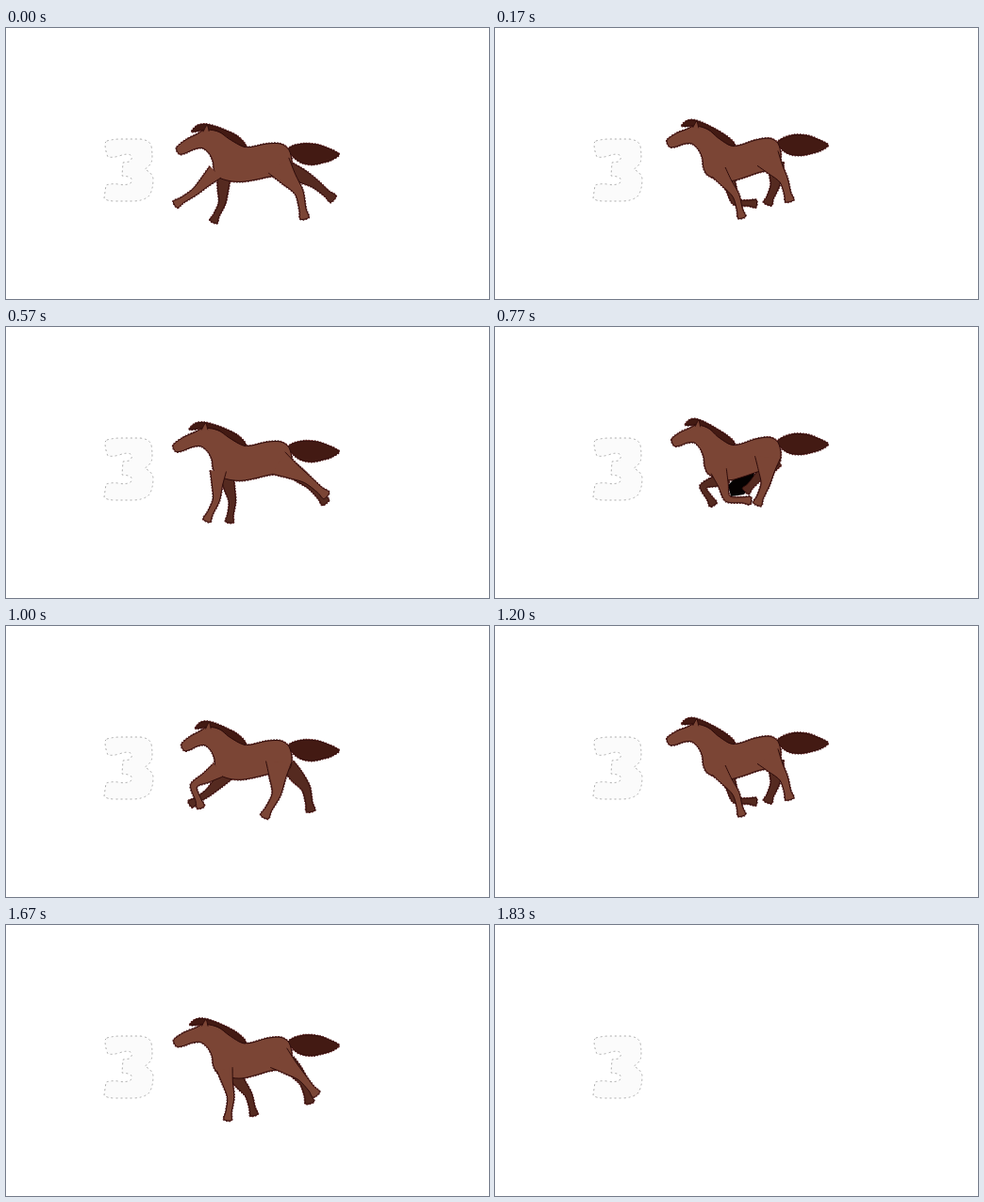
Animation of 512 by 288 pixels, one loop 2010 ms. Source, as an HTML page:

```html
<!DOCTYPE html>
<html lang="en">
<head>
<meta charset="utf-8">
<title>Galloping horse</title>
<style>
html, body { margin: 0; width: 100%; height: 100%; overflow: hidden; background: #fff; }
svg { display: block; width: 100vw; height: 100vh; }
path { stroke-linejoin: round; }
.digit { fill: #fbfbfb; stroke: #777; stroke-width: .6; stroke-dasharray: 2 3; }
.pose { visibility: hidden; }
.fringe { fill: none; stroke: #3a1010; stroke-width: 2.4; stroke-dasharray: 1.6 1.4; }
.rim { fill: #8f4440; stroke: #a5544e; stroke-width: 1.2; }
.coat { fill: #7b4535; }
.shade { fill: #552a20; }
.hair { fill: #431a13; }
.gap { fill: #050202; }
.line { fill: none; stroke: #2c0b0a; stroke-width: 1; }
</style>
</head>
<body>
<svg id="stage" viewBox="0 0 512 288">
  <path class="digit" role="img" aria-label="3" d="M107 120Q114 118 122 118H142Q152 119 154 125Q156 138 154 143Q151 148 147 150Q155 154 156 160Q156 173 151 179Q145 184 134 184H116Q107 184 104 181L106 167Q112 165 119 166Q128 168 133 164Q134 159 130 158L123 157L124 143L131 142Q135 138 132 135Q128 133 120 136Q113 138 108 137Q105 130 105 122Z"/>
</svg>
<script>
const stage = document.getElementById('stage');
const points = text => text.split(' ').map(pair => pair.split(',').map(Number));

// The horse at mid-stride.
const body = points('183,123 186,130 193,129 200,126 209,125 216,131 220,140 221,149 225,157 237,162 250,163 264,160 278,156 299,151 303,139 300,126 291,120 276,121 256,126 243,120 228,110 214,105 204,110 193,115');
const mane = points('199,107 204,101 212,100 222,103 233,108 244,114 252,121 254,126 247,124 236,117 226,109 214,106');
const tail = points('299,126 305,121 317,118 331,119 342,123 353,129 345,135 335,138 325,140 315,139 307,135');
const ear = points('210,108 214,101 216,108');

// Degrees forward of straight down for each pose of the stride.
const fore = {
  upper: [46, 4, -12, -36, -18, 65, 57], lower: [57, 25, 8, -15, -85, -30, -18],
  length: [31, 24], widths: [17, 11, 7, 6, 8], far: [9, 5]
};
const hind = {
  upper: [-37, -60, -50, -36, 5, 48, 4], lower: [-12, -50, -40, -16, 22, 42, 28],
  length: [36, 28], widths: [27, 17, 9, 7, 9], far: [10, 3]
};
const poseCount = 7, gathered = 4;

// Start of each step; the stride repeats until the horse vanishes.
const steps = [0, 30, 100, 170, 270, 350, 430, 500, 570, 640, 700, 770, 830, 950,
  1070, 1100, 1150, 1200, 1270, 1350, 1430, 1500, 1570, 1670, 1770];
const goneAt = 1830, loop = 2010;

// Smooth curve through points.
function curve(pts, closed = true) {
  const n = pts.length;
  const at = i => closed ? pts[(i + n) % n] : pts[Math.max(0, Math.min(n - 1, i))];
  let d = 'M' + pts[0];
  for (let i = 0; i < (closed ? n : n - 1); i++) {
    const [p, a, b, q] = [at(i - 1), at(i), at(i + 1), at(i + 2)];
    const c1 = a.map((v, j) => v + (b[j] - p[j]) / 7);
    const c2 = b.map((v, j) => v - (q[j] - a[j]) / 7);
    d += `C${c1} ${c2} ${b}`;
  }
  return closed ? d + 'Z' : d;
}

// Head and rump rise and fall about the withers while the head nods.
const rock = (pts, phase) => pts.map(([x, y]) => {
  const reach = Math.max(0, Math.min(1, (235 - x) / 50));
  const lift = Math.min(1.4, Math.abs(x - 245) / 55);
  return [x - 6 * Math.sin(phase + .35) * reach, y + 3.7 * Math.cos(phase) * lift];
});

const along = ([x, y], angle, length) => {
  const a = angle * Math.PI / 180;
  return [x - length * Math.sin(a), y + length * Math.cos(a)];
};
const between = (a, b, k) => a.map((v, i) => v + (b[i] - v) * k);

// Tapered limb, left open at the top so it merges with the torso.
function limb(joints, widths) {
  const left = [], right = [];
  joints.forEach(([x, y], i) => {
    const a = joints[Math.max(0, i - 1)], b = joints[Math.min(joints.length - 1, i + 1)];
    const dx = b[0] - a[0], dy = b[1] - a[1], r = widths[i] / 2 / Math.hypot(dx, dy);
    left.push([x - dy * r, y + dx * r]);
    right.unshift([x + dy * r, y - dx * r]);
  });
  return curve(left.concat(right), false);
}

// The far leg runs one pose ahead of the near one.
function leg(kind, root, pose, scale, isFar) {
  const i = (pose + isFar) % poseCount;
  const size = scale * (isFar ? .91 : 1);
  const top = isFar ? root.map((v, j) => v + kind.far[j]) : root;
  const knee = along(top, kind.upper[i], kind.length[0] * size);
  const hoof = along(knee, kind.lower[i], kind.length[1] * size);
  const widths = isFar ? kind.widths.map(w => Math.min(w, 14)) : kind.widths;
  return limb([top, between(top, knee, .5), knee, between(knee, hoof, .65), hoof], widths);
}

function add(parent, tag, cls, d) {
  const el = document.createElementNS('http://www.w3.org/2000/svg', tag);
  el.setAttribute('class', cls);
  if (d) el.setAttribute('d', d);
  return parent.appendChild(el);
}

function drawPose(pose) {
  const g = add(stage, 'g', 'pose');
  const phase = pose / poseCount * 2 * Math.PI, swing = Math.cos(phase);
  const shoulder = [230 - 8 * swing, 153], hip = [289, 142 + 4 * swing];
  const fold = .9 + .1 * swing;
  const shape = pts => curve(rock(pts, phase));
  const parts = [
    ['hair', shape(tail)],
    ['shade', leg(fore, shoulder, pose, 1, 1)],
    ['shade', leg(hind, hip, pose, fold, 1)],
    ['coat', shape(body)],
    ['hair', shape(mane)],
    ['coat', curve(rock(ear, phase), false)],
    ['coat', leg(fore, shoulder, pose, 1, 0)],
    ['coat', leg(hind, hip, pose, fold, 0)]
  ];
  for (const cls of ['fringe', 'rim']) parts.forEach(([, d]) => add(g, 'path', cls, d));
  if (pose === gathered) add(g, 'path', 'gap', 'M247 168L257 158L275 154L274 163L264 178L250 180Z');
  for (const [cls, d] of parts) {
    add(g, 'path', cls, d);
    add(g, 'path', 'line', d);
  }
  return g;
}

const poses = Array.from({ length: poseCount }, (_, i) => drawPose(i));

function play(now) {
  const t = now % loop;
  const step = steps.filter(start => start <= t).length - 1;
  const shown = t < goneAt ? step % poseCount : -1;
  poses.forEach((g, i) => { g.style.visibility = i === shown ? 'visible' : 'hidden'; });
  requestAnimationFrame(play);
}
play(performance.now());
</script>
</body>
</html>
```
